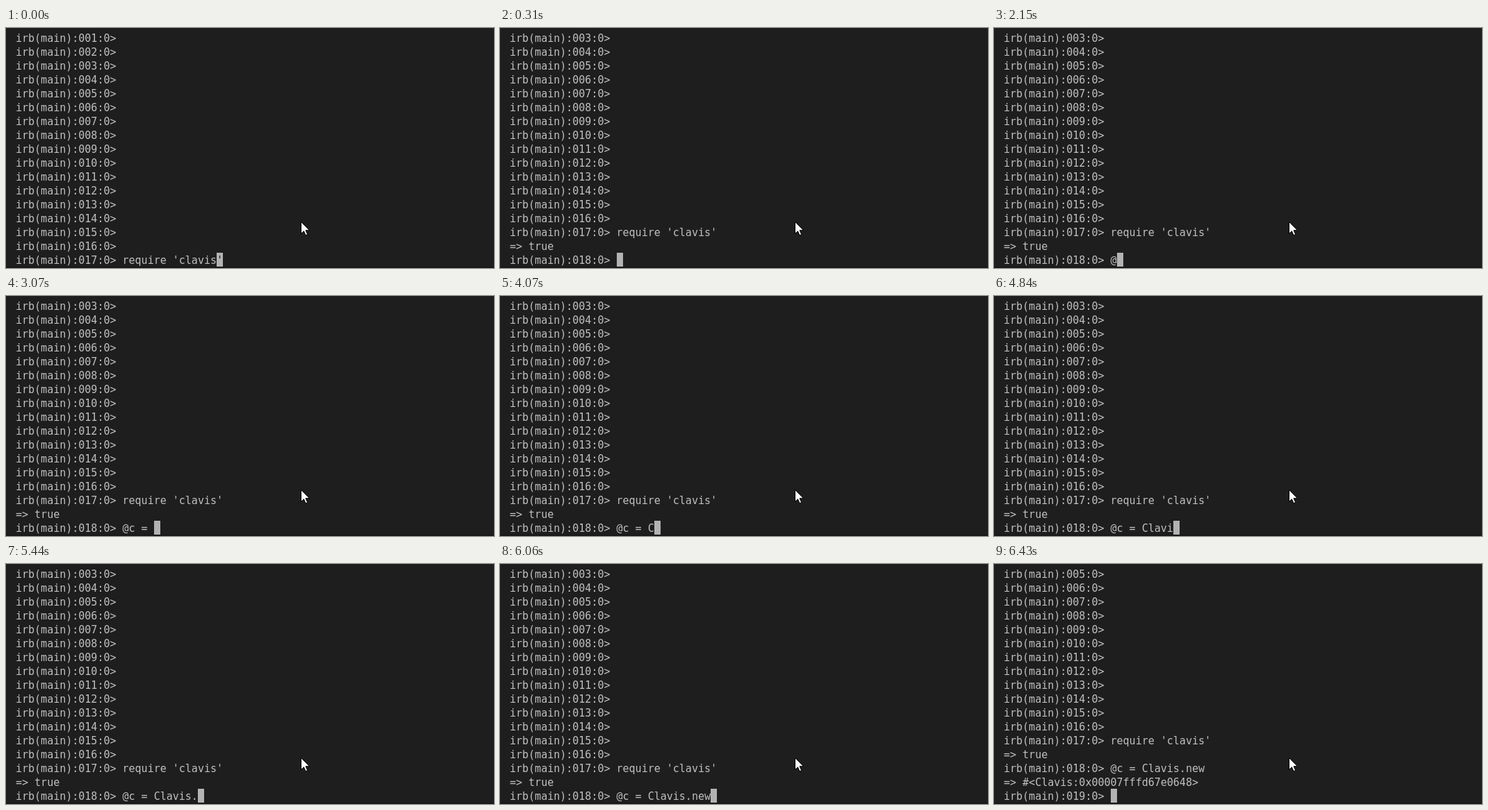
Write an HTML page that moves like this. It is 702 px wide and 346 px high and loops after 8 s.

```html
<!DOCTYPE html>
<html lang="en">
<head>
<meta charset="utf-8">
<title>irb session</title>
<style>
  html, body { margin: 0; width: 100%; height: 100%; overflow: hidden; background: #1e1e1e; }
  pre {
    position: absolute; left: 14px; top: 5px; margin: 0;
    font: 15px/20px "DejaVu Sans Mono", "Noto Sans Mono", monospace;
    font-variant-ligatures: none;
    color: #c0c0c0;
  }
  #caret {
    display: inline-block; vertical-align: top;
    width: 9px; height: 20px; margin-top: -1px; line-height: 22px;
    background: #b3b3b3; color: #1e1e1e;
  }
  svg { position: absolute; left: 0; top: 0; }
</style>
</head>
<body>
<pre><span id="text"></span><span id="caret"></span></pre>
<svg width="702" height="346">
  <rect y="344" width="702" height="2" fill="#181818"/>
  <path d="M424.5 279.5v17l3.9-3.7 2.6 5.9 2.7-1.1-2.6-5.9h5.4z" fill="#fff" stroke="#000"/>
</svg>
<script>
const LOOP = 8000, ROWS = 17;
const ENTER = 230, LOADED = 310, CREATED = 6430;
const REQUIRE = "require 'clavis'", CREATE = "@c = Clavis.new";
// When each character of CREATE is typed
const KEYS = [2150, 2310, 2530, 2840, 3070, 4070, 4300, 4380,
              4760, 4840, 4920, 5440, 5900, 5980, 6060];

const text = document.getElementById("text");
const caret = document.getElementById("caret");
const prompt = n => `irb(main):${String(n).padStart(3, "0")}:0> `;
const blank = Array.from({ length: 16 }, (_, i) => prompt(i + 1));

function screen(t) {
  const lines = [...blank];
  if (t < ENTER) return [...lines, prompt(17) + REQUIRE.slice(0, -1)];
  lines.push(prompt(17) + REQUIRE);
  if (t < LOADED) return [...lines, ""];
  lines.push("=> true");
  const typed = KEYS.filter(k => k <= t).length;
  lines.push(prompt(18) + CREATE.slice(0, typed));
  if (t >= CREATED) lines.push("=> #<Clavis:0x00007fffd67e0648>", prompt(19));
  return lines;
}

function draw() {
  const t = performance.now() % LOOP;
  const content = screen(t).slice(-ROWS).join("\n");
  if (text.textContent !== content) {
    text.textContent = content;
    caret.textContent = t < ENTER ? "'" : " ";
  }
  requestAnimationFrame(draw);
}
draw();
</script>
</body>
</html>
```
